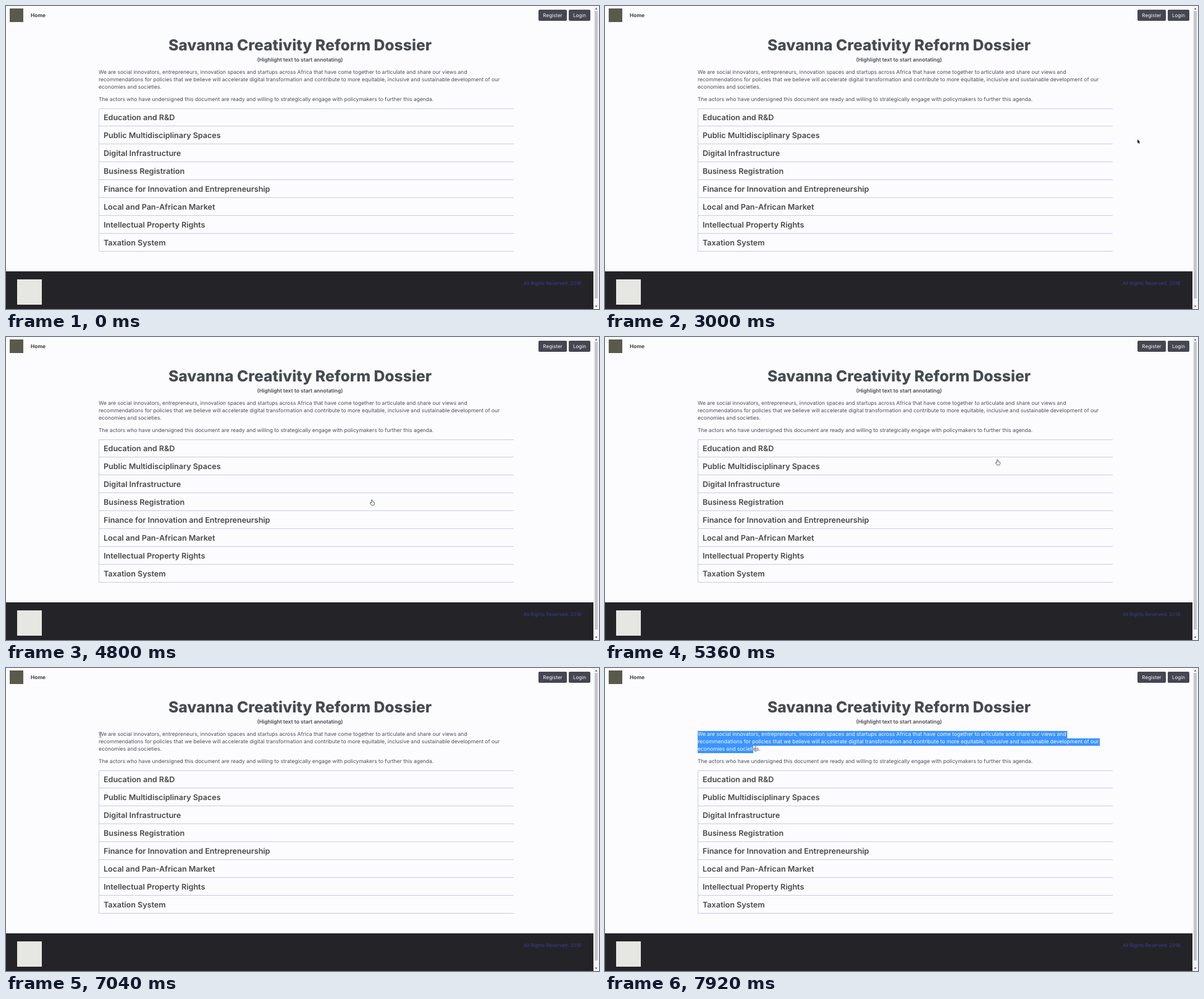
Recreate the animation shown at these times as an HTML page with a canvas. Size 960 by 491 pixels, loop 8000 ms.

```html
<!DOCTYPE html>
<html lang="en">
<head>
<meta charset="utf-8">
<title>Annotate the text</title>
<style>
html, body { margin: 0; width: 100%; height: 100%; overflow: hidden; background: #fcfcfe; }
canvas { display: block; }
</style>
</head>
<body>
<canvas id="stage" width="960" height="491"></canvas>
<script>
const ctx = document.getElementById('stage').getContext('2d');
const LOOP = 8000, STEP = 40;
const LEFT = 150, RIGHT = 822;
const LIST_TOP = 166, ROW = 29;
const LINE_TOP = 102, LINE = 12;
const PAPER = '#fcfcfe', INK = '#4c4c5c', RULE = '#c8caf2';

const lines = [
  'We are social innovators, entrepreneurs, innovation spaces and startups across Africa that have come together to articulate and share our views and',
  'recommendations for policies that we believe will accelerate digital transformation and contribute to more equitable, inclusive and sustainable development of our',
  'economies and societies.'
];
const closing = 'The actors who have undersigned this document are ready and willing to strategically engage with policymakers to further this agenda.';
const topics = [
  'Education and R&D', 'Public Multidisciplinary Spaces', 'Digital Infrastructure',
  'Business Registration', 'Finance for Innovation and Entrepreneurship',
  'Local and Pan-African Market', 'Intellectual Property Rights', 'Taxation System'
];
const LIST_BOTTOM = LIST_TOP + ROW * topics.length;

// The pointer rests between moves
const APPEAR = 3000, SETTLE = 3400, DRAG = 7640;
const entry = { x: 862, y: 216 };
const moves = [
  { from: APPEAR, to: 3480, x: 600, y: 338 },
  { from: 3480, to: 3640, x: 589, y: 303 },
  { from: 4760, to: 4800, x: 593, y: 268 },
  { from: 4800, to: 5600, x: 648, y: 185 },
  { from: 5680, to: 6040, x: 590, y: 104 },
  { from: 6040, to: 6560, x: 153, y: 108 },
  { from: DRAG, to: 7920, x: 244, y: 131 }
];

const arrow = new Path2D('M0 0v6.2l1.4-1.2 1 2.2 1.1-.5-1-2.1 1.9-.2z');
const hand = new Path2D('M-1.5-4h1.5l.5 3 3 1v2l-1 2.5h-4l-2.3-3.5.8-1 1.5 1z');
const beam = new Path2D('M-2-4h4M0-4v8M-2 4h4');

const font = (weight, size) => `${weight} ${size}px Inter, sans-serif`;
const BODY = font(400, 8.5);

function rect(x, y, w, h, color) {
  ctx.fillStyle = color;
  ctx.fillRect(x, y, w, h);
}

function text(str, x, y, face, color, align = 'left') {
  ctx.font = face;
  ctx.fillStyle = color;
  ctx.textAlign = align;
  ctx.fillText(str, x, y);
}

function button(label, x, w) {
  ctx.fillStyle = '#464652';
  ctx.beginPath();
  ctx.roundRect(x, 6, w, 18, 2);
  ctx.fill();
  text(label, x + w / 2, 18, font(400, 8.1), '#f6f6fa', 'center');
}

function header() {
  rect(6, 4, 22, 22, '#5a5a4c');
  text('Home', 40, 18, font(700, 8.4), '#404046');
  button('Register', 862, 46);
  button('Login', 911, 35);
  text('Savanna Creativity Reform Dossier', 476, 72, font(800, 24.7), '#464a52', 'center');
  text('(Highlight text to start annotating)', 476, 90, font(600, 8.5), '#464650', 'center');
}

function selectedWidth(i, p) {
  const row = Math.floor((p.y - LINE_TOP) / LINE);
  const width = n => ctx.measureText(lines[i].slice(0, n)).width;
  ctx.font = BODY;
  if (i > row) return 0;
  if (i < row) return width(lines[i].length) + 2;
  let n = 0;
  while (n < lines[i].length && LEFT + width(n + 1) <= p.x) n++;
  return width(n);
}

function paragraphs(p, dragging) {
  lines.forEach((line, i) => {
    const top = LINE_TOP + LINE * i;
    text(line, LEFT, top + 8, BODY, INK);
    if (!dragging) return;
    const w = selectedWidth(i, p);
    ctx.save();
    ctx.beginPath();
    ctx.rect(LEFT, top, w, LINE);
    ctx.clip();
    rect(LEFT, top, w, LINE, '#3c94fc');
    text(line, LEFT, top + 8, BODY, '#f4f8ff');
    ctx.restore();
  });
  text(closing, LEFT, 154, BODY, INK);
}

function topicList(settled) {
  ctx.strokeStyle = RULE;
  ctx.lineWidth = 1;
  ctx.setLineDash(settled ? [] : [2, 1]);
  ctx.strokeRect(LEFT + 0.5, LIST_TOP + 0.5, 0, LIST_BOTTOM - LIST_TOP - 1);
  ctx.setLineDash([]);
  for (let y = LIST_TOP; y <= LIST_BOTTOM; y += ROW) {
    rect(LEFT + 1, y === LIST_TOP ? y : y - 1, RIGHT - LEFT - 1, 1, RULE);
  }
  topics.forEach((name, i) =>
    text(name, 158, LIST_TOP + 18.5 + ROW * i, font(600, 12.55), '#484848'));
}

function footer() {
  rect(0, 430, 951, 61, '#242428');
  rect(18, 443, 40, 41, '#e6e6e2');
  text('All Rights Reserved. 2018', 838, 452, font(400, 7.8), '#3c3c98');
}

function scrollArrow(y, dy) {
  ctx.fillStyle = '#55555a';
  ctx.beginPath();
  ctx.moveTo(953.5, y);
  ctx.lineTo(955.5, y + dy);
  ctx.lineTo(957.5, y);
  ctx.fill();
}

function scrollbar() {
  rect(951, 0, 9, 491, '#f5f5f7');
  rect(953, 8, 5, 466, '#c6c6ca');
  scrollArrow(5.5, -2.5);
  scrollArrow(485.5, 2.5);
}

function pointer({ x, y }) {
  const inside = x >= LEFT && x <= RIGHT;
  ctx.save();
  ctx.translate(x, y);
  ctx.lineWidth = 0.8;
  if (inside && y >= LIST_TOP && y <= LIST_BOTTOM) {
    ctx.fillStyle = PAPER;
    ctx.fill(hand);
    ctx.strokeStyle = '#44445c';
    ctx.stroke(hand);
  } else if (inside && y > 100 && y < 160) {
    ctx.strokeStyle = '#777780';
    ctx.stroke(beam);
  } else {
    ctx.fillStyle = '#101014';
    ctx.fill(arrow);
  }
  ctx.restore();
}

function pointerAt(t) {
  let { x, y } = entry;
  for (const m of moves) {
    const k = Math.min(1, Math.max(0, (t - m.from) / (m.to - m.from)));
    const ease = k * k * (3 - 2 * k);
    x += (m.x - x) * ease;
    y += (m.y - y) * ease;
  }
  return { x, y };
}

function draw(time) {
  const t = Math.floor((time % LOOP) / STEP) * STEP;
  const p = pointerAt(t);
  ctx.textRendering = 'geometricPrecision';
  rect(0, 0, 960, 491, PAPER);
  header();
  paragraphs(p, t > DRAG);
  topicList(t >= SETTLE);
  footer();
  scrollbar();
  if (t >= APPEAR) pointer(p);
}

const start = performance.now();
function tick() {
  draw(performance.now() - start);
  requestAnimationFrame(tick);
}
tick();
</script>
</body>
</html>
```
